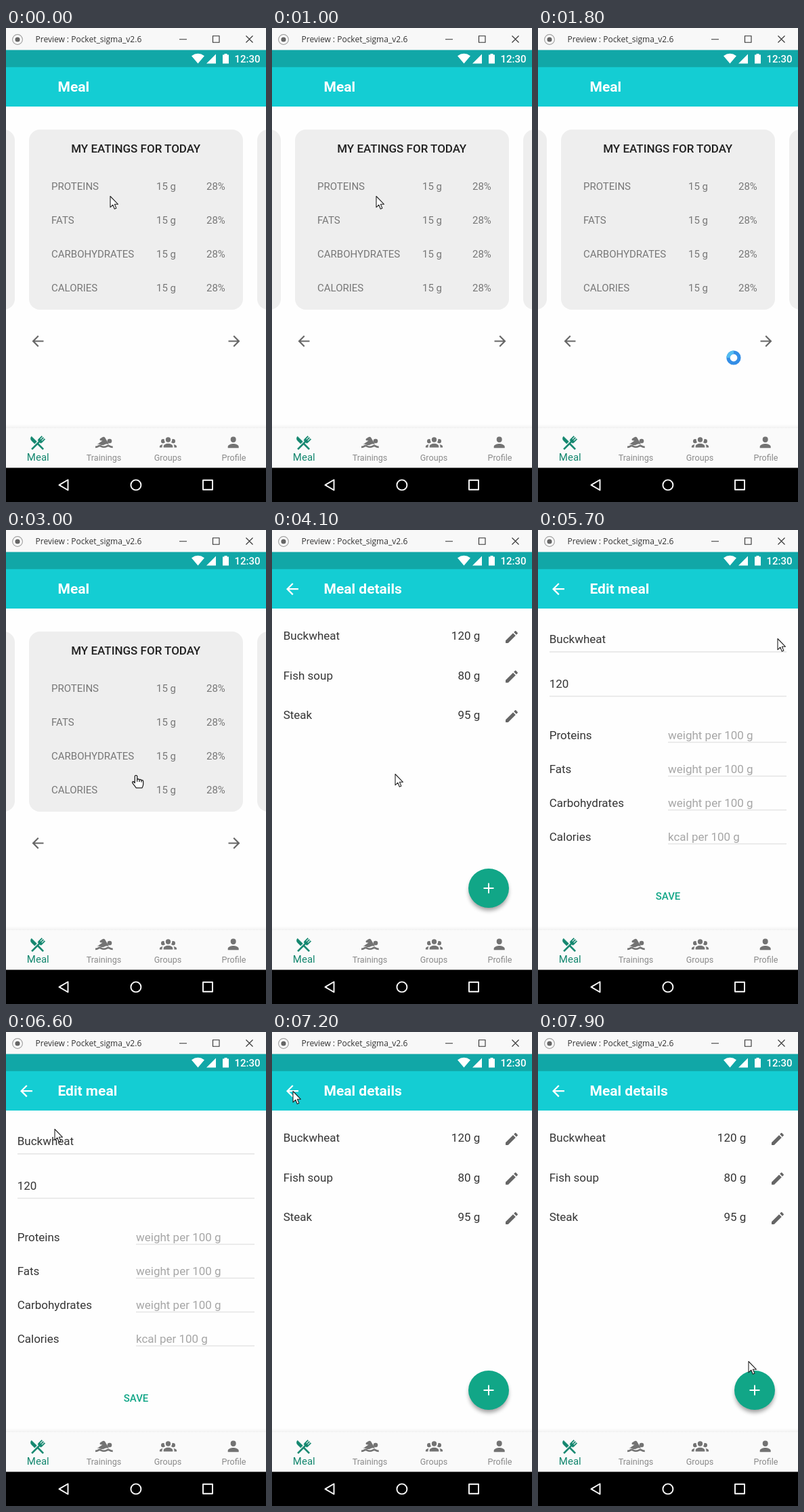
Recreate the animation shown at these times as an HTML page. Size 384 by 700 pixels, loop 8 s.

```html
<!DOCTYPE html>
<html lang="en">
<head>
<meta charset="utf-8">
<title>Meal tracker preview</title>
<style>
  html, body { margin: 0; width: 100%; height: 100%; overflow: hidden; background: #fff; }
  svg { display: block; width: 384px; height: 700px; font-family: Roboto, sans-serif; }
  .mid { text-anchor: middle; }
  .end { text-anchor: end; }
  .head { font-size: 21px; font-weight: 700; fill: #fff; }
  .row { font-size: 15px; fill: #777; }
  .body { font-size: 17px; fill: #353535; }
  .hint { font-size: 17px; fill: #a6a6a6; }
  .tab { font-size: 12.6px; fill: #8a8a8a; text-anchor: middle; }
  .rule { stroke: #e4e4e4; stroke-width: 1.5; }
</style>
</head>
<body>
<svg viewBox="0 0 384 700" xmlns="http://www.w3.org/2000/svg">
  <defs>
    <path id="back" d="M8-1H-4.17l5.59-5.59L0-8l-8 8 8 8 1.41-1.41L-4.17 1H8z"/>
    <path id="pencil" transform="translate(-12 -12)" d="M3 17.25V21h3.75L17.81 9.94l-3.75-3.75zM20.71 7.04c.39-.39.39-1.02 0-1.41l-2.34-2.34c-.39-.39-1.02-.39-1.41 0l-1.83 1.83 3.75 3.75z"/>
    <linearGradient id="lift" x2="0" y2="1">
      <stop stop-color="#000" stop-opacity="0"/>
      <stop offset="1" stop-color="#000" stop-opacity=".05"/>
    </linearGradient>
    <filter id="soft" x="-30%" y="-30%" width="160%" height="160%"><feGaussianBlur stdDeviation="3"/></filter>
  </defs>

  <rect width="384" height="700" fill="#fefefe"/>

  <!-- window bar -->
  <rect width="384" height="33" fill="#f8f8f8"/>
  <circle cx="17" cy="17" r="7.3" fill="#fff" stroke="#a0a0a0" stroke-width="1.2"/>
  <circle cx="17" cy="17" r="3.6" fill="#666"/>
  <text x="43.5" y="21" font-size="12" fill="#333" font-family="'Open Sans', sans-serif">Preview : Pocket_sigma_v2.6</text>
  <path d="M256 16.700H267M305.500 11.700h9.500v9.500h-9.500zM354.500 11.500l10 10m0-10l-10 10" fill="none" stroke="#333" stroke-width="1.1"/>

  <!-- status and app bar -->
  <rect y="32.5" width="384" height="25.500" fill="#11a7a7"/>
  <path d="M283.500 52.500L274 41.200Q283.500 34.300 293 41.200ZM296 52.500H310V38.500ZM320 39.500h2.500v-1.500h4v1.500h2.500v13h-9z" fill="#fff"/>
  <text x="337.500" y="51" font-size="15" font-weight="500" fill="#fff">12:30</text>
  <rect y="57.800" width="384" height="58.200" fill="#14cdd3"/>

  <g id="meal">
    <text class="head" x="76.500" y="93.500">Meal</text>
    <g fill="#eee">
      <rect x="-303" y="150" width="316" height="266" rx="16"/>
      <rect x="34" y="150" width="316" height="266" rx="16"/>
      <rect x="371" y="150" width="316" height="266" rx="16"/>
    </g>
    <text class="mid" x="191.700" y="184" font-size="17" font-weight="500" fill="#212121">MY EATINGS FOR TODAY</text>
    <g fill="#666">
      <use href="#back" transform="translate(47 462.500) scale(1.06)"/>
      <use href="#back" transform="translate(337 462.500) scale(-1.06 1.06)"/>
    </g>
  </g>

  <g id="details">
    <text class="head" x="76.500" y="93.500">Meal details</text>
    <ellipse cx="320" cy="534" rx="29" ry="28" opacity=".38" filter="url(#soft)"/>
    <ellipse cx="320" cy="529" rx="30" ry="29" fill="#11a687"/>
    <path d="M312.500 529h15m-7.500-7.500v15" stroke="#fff" stroke-width="2"/>
  </g>

  <g id="edit">
    <text class="head" x="76.500" y="93.500">Edit meal</text>
    <text class="body" x="16.700" y="167">Buckwheat</text>
    <text class="body" x="16.700" y="233">120</text>
    <path class="rule" d="M17 180H367M17 245.500H367"/>
    <text class="mid" x="192" y="545.500" font-size="15" font-weight="500" fill="#12a687">SAVE</text>
  </g>

  <use id="up" href="#back" transform="translate(30 87.200) scale(1.12)" fill="#fff"/>

  <!-- tabs -->
  <rect y="585" width="384" height="6" fill="url(#lift)"/>
  <rect y="591" width="384" height="59" fill="#fafafa"/>
  <path transform="translate(33.400 599.300) scale(1.1)" fill="#14876f" stroke="#14876f" stroke-width=".5" d="M8.100 13.340L3.910 9.160C2.350 7.590 2.350 5.060 3.910 3.500L10.930 10.500zM13.410 13L20.290 19.880 18.880 21.290 12 14.410 5.120 21.290 3.710 19.880 13.360 10.220 13.160 10C12.380 9.230 12.380 7.970 13.160 7.190L17.500 2.820 18.430 3.740 15.190 7 16.150 7.940 19.390 4.690 20.310 5.610 17.060 8.850 18 9.810 21.260 6.560 22.180 7.500 17.810 11.840C17.030 12.620 15.770 12.620 15 11.840L14.780 11.640z"/>
  <g fill="#737373">
    <circle cx="153" cy="610" r="3.300"/>
    <path d="M134 615.200L142.500 609.500 139.500 609.200Q137.500 608 139 606.500L142.500 604.200Q144.800 603 146.300 605L152 614.800Q148.500 613.500 145.500 615.200 142 617 139 615.200 136.500 613.800 134 615.200Z"/>
    <path d="M132 618.800q3.200 0 4.300-1.200 2-1.300 4 0 4.200 2.300 8.600 0 2.100-1.300 4.200 0 1.500 1.200 4.600 1.200" fill="none" stroke="#737373" stroke-width="2.700"/>
    <path transform="translate(226.900 598.600) scale(1.05)" d="M12 5.500a3.500 3.500 0 0 1 0 7 3.500 3.500 0 0 1 0-7M5 8C5.560 8 6.080 8.150 6.530 8.420 6.380 9.850 6.800 11.270 7.660 12.380 7.160 13.340 6.160 14 5 14A3 3 0 0 1 5 8M19 8A3 3 0 0 1 19 14C17.840 14 16.840 13.340 16.340 12.380 17.200 11.270 17.620 9.850 17.470 8.420 17.920 8.150 18.440 8 19 8M5.500 18.250C5.500 16.180 8.410 14.500 12 14.500S18.500 16.180 18.500 18.250V20H5.500zM0 20V18.500C0 17.110 1.890 15.940 4.450 15.600 3.860 16.280 3.500 17.220 3.500 18.250V20zM24 20H20.500V18.250C20.500 17.220 20.140 16.280 19.550 15.600 22.110 15.940 24 17.110 24 18.500z"/>
    <path transform="translate(323.700 599.400) scale(1 1.040)" d="M12 12a4 4 0 1 0 0-8 4 4 0 0 0 0 8zm0 2c-2.670 0-8 1.340-8 4v2h16v-2c0-2.660-5.330-4-8-4z"/>
  </g>
  <text class="mid" x="47.300" y="639" font-size="15" fill="#14876f">Meal</text>
  <text class="tab" x="144.500" y="639">Trainings</text>
  <text class="tab" x="239" y="639">Groups</text>
  <text class="tab" x="336.500" y="639">Profile</text>

  <!-- system keys -->
  <rect y="649.500" width="384" height="51"/>
  <path d="M91.500 667.300V682.500L78.500 674.900ZM291 667.800h14v14h-14z" fill="none" stroke="#fff" stroke-width="1.900" stroke-linejoin="round"/>
  <circle cx="191.900" cy="674.900" r="7.500" fill="none" stroke="#fff" stroke-width="1.900"/>

  <g id="cursor">
    <path id="arrow" d="M1 .5V16.800L4.800 13.200 7.300 19.200 9.900 18.100 7.400 12.300H12.500Z" fill="#fff" stroke="#222" stroke-width="1.100" stroke-linejoin="round"/>
    <path id="hand" d="M-1.700 11.500V1.800Q-1.700.4 0 .4T1.700 1.800V6.300Q3.400 5 5 6.900 6.700 5.900 8.100 7.600 10.700 7 10.700 9.500V13.500Q10.700 15.500 9 18.800H.3L-4.800 12.200Q-6 10.300-4.700 9.600-3.600 9-1.700 11.500ZM1.700 6.300V9.800M5 6.900V10M8.100 7.600V10.400" fill="#fff" stroke="#222" stroke-width="1.300" stroke-linejoin="round"/>
    <g id="busy" fill="none" stroke-width="5.200">
      <circle r="8" stroke="#348ee6"/>
      <path id="arc" d="M-8 0A8 8 0 0 1 0-8" stroke="#55bdf0"/>
    </g>
  </g>
</svg>
<script>
  const LOOP = 8000, STEP = 100;
  const $ = id => document.getElementById(id);

  function add(parent, tag, attrs, text = '') {
    const el = document.createElementNS('http://www.w3.org/2000/svg', tag);
    for (const k in attrs) el.setAttribute(k, attrs[k]);
    el.textContent = text;
    parent.append(el);
  }
  const label = (page, cls, x, y, text) => add($(page), 'text', { class: cls, x, y }, text);

  ['Proteins', 'Fats', 'Carbohydrates', 'Calories'].forEach((name, i) => {
    const y = 239 + i * 50, fy = y + 70;
    label('meal', 'row', 67, y, name.toUpperCase());
    label('meal', 'row', 222, y, '15 g');
    label('meal', 'row', 296, y, '28%');
    label('edit', 'body', 16.7, fy, name);
    label('edit', 'hint', 192, fy, (i < 3 ? 'weight' : 'kcal') + ' per 100 g');
    add($('edit'), 'path', { class: 'rule', d: `M192 ${fy + 4.5}H367` });
  });

  [['Buckwheat', 120], ['Fish soup', 80], ['Steak', 95]].forEach(([name, grams], i) => {
    const y = 162 + i * 58.5;
    label('details', 'body', 16.7, y, name);
    label('details', 'body end', 307.3, y, grams + ' g');
    add($('details'), 'use', { href: '#pencil', x: 354, y: y - 4, fill: '#666' });
  });

  // [ms, state] switches
  const pages = [[0, 'meal'], [4100, 'details'], [5400, 'edit'], [7200, 'details']];
  const kinds = [[0, 'arrow'], [1800, 'busy'], [2300, 'arrow'], [2700, 'hand'], [4100, 'arrow'],
    [5000, 'hand'], [5400, 'arrow'], [6900, 'hand'], [7200, 'arrow']];
  // [ms, x, y] pointer positions
  const path = [[0, 153, 248], [1300, 153, 248], [1400, 154, 250], [1500, 154, 250], [1800, 289, 487],
    [2000, 289, 487], [2200, 330, 520], [2400, 320, 490], [2700, 225, 405], [2900, 195, 367],
    [3000, 192, 362], [4000, 192, 362], [4100, 181, 360], [4500, 250, 275], [4900, 338, 172],
    [5100, 352, 156], [5400, 355, 158], [5700, 353, 160], [5900, 353, 160], [6100, 295, 198],
    [6300, 190, 205], [6600, 71, 143], [6800, 45, 107], [6950, 31, 88], [7200, 30, 87],
    [7400, 30, 110], [7700, 40, 210], [7800, 165, 355], [7900, 310, 486], [LOOP, 310, 486]];

  const at = (table, t) => table.filter(row => row[0] <= t).pop()[1];

  function place(t) {
    const i = path.findIndex(p => p[0] > t);
    const [t0, x0, y0] = path[i - 1], [t1, x1, y1] = path[i];
    const k = (t - t0) / (t1 - t0);
    return [x0 + (x1 - x0) * k, y0 + (y1 - y0) * k].map(Math.round);
  }

  const show = (ids, active) => ids.forEach(id => $(id).style.display = id === active ? '' : 'none');

  function draw(ms) {
    const t = Math.floor((ms % LOOP) / STEP) * STEP;
    const page = at(pages, t);
    show(['meal', 'details', 'edit'], page);
    show(['arrow', 'hand', 'busy'], at(kinds, t));
    $('up').style.display = page === 'meal' ? 'none' : '';
    $('cursor').setAttribute('transform', `translate(${place(t)})`);
    $('arc').setAttribute('transform', `rotate(${t < 2100 ? 0 : (t - 2000) * 0.36})`);
  }

  const start = performance.now();
  function tick() {
    draw(performance.now() - start);
    requestAnimationFrame(tick);
  }
  tick();
</script>
</body>
</html>
```
